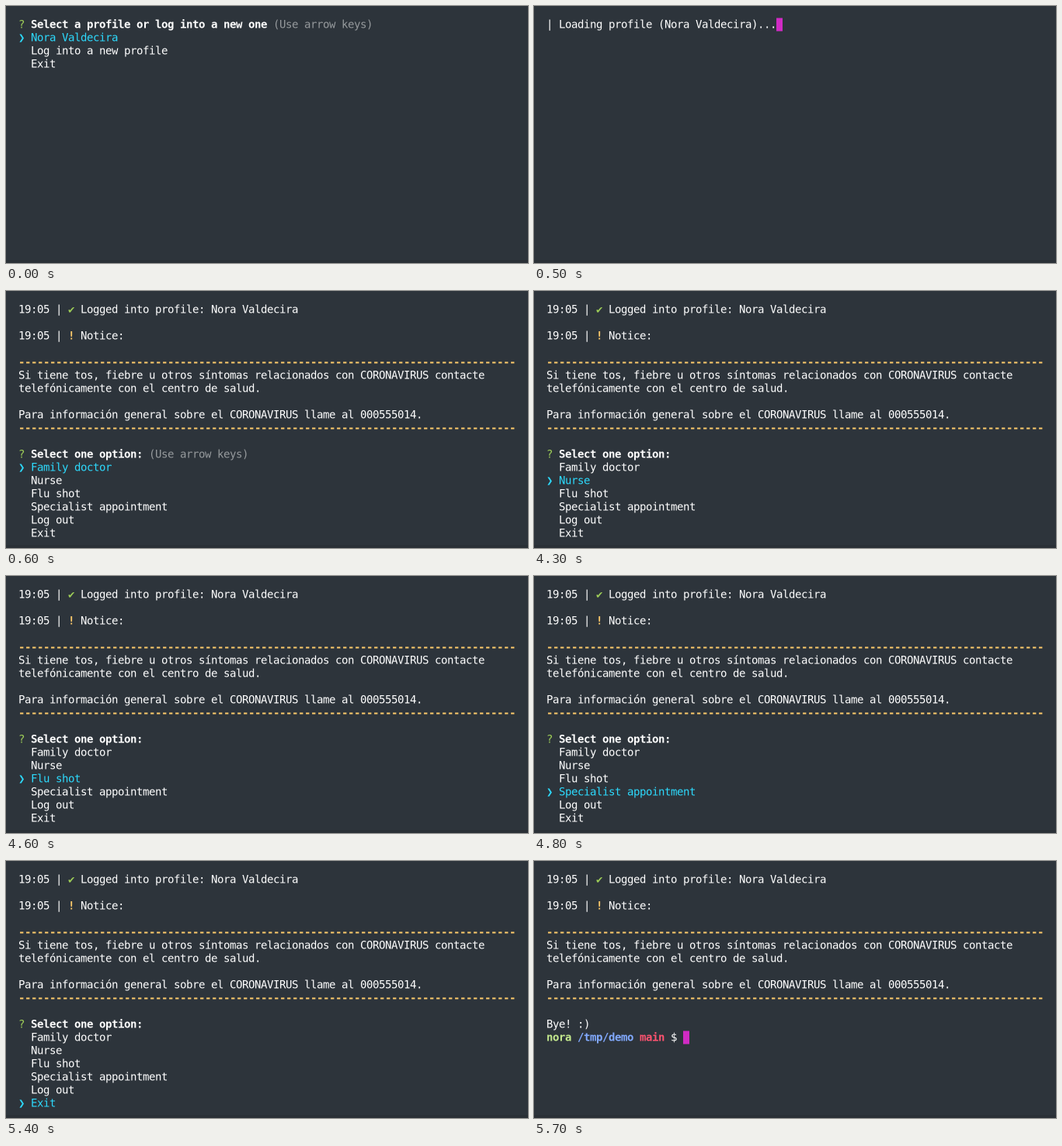
Recreate the animation shown at these times as an HTML page with a canvas. Size 672 by 332 pixels, loop 8000 ms.

```html
<!DOCTYPE html>
<html lang="en">
<head>
<meta charset="utf-8">
<title>Terminal session</title>
<style>
  html, body { margin: 0; width: 100%; height: 100%; overflow: hidden; background: #2d343b; }
  canvas { display: block; width: 672px; height: 332px; }
</style>
</head>
<body>
<canvas id="screen"></canvas>
<script>
const W = 672, H = 332;
const DENSITY = 2; // drawn at double density, like a HiDPI terminal
const screen2d = document.getElementById('screen');
screen2d.width = W * DENSITY;
screen2d.height = H * DENSITY;
const ctx = screen2d.getContext('2d');
ctx.scale(DENSITY, DENSITY);

const LOOP = 8000;
const CELL_W = 8, CELL_H = 17, LEFT = 16, TOP = 15.5, BASELINE = 13;
const FONT = '14px "DejaVu Sans Mono", "DejaVu Sans", monospace';

const COLOR = {
  back: '#2d343b', edge: '#2a3036', text: '#ffffff', dim: '#969a9d',
  green: '#9ece58', lime: '#c3e88d', yellow: '#ffcb6b', cyan: '#2ddafd',
  blue: '#82aaff', red: '#ff5370', cursor: '#d02bc4'
};

const USER = 'Nora Valdecira';
const HINT = '(Use arrow keys)';
const OPTIONS = ['Family doctor', 'Nurse', 'Flu shot', 'Specialist appointment', 'Log out', 'Exit'];
const MOVES = [4300, 4600, 4800, 5100, 5400];
const LOADING = 500, LOGGED_IN = 600, BYE = 5700;

// Writes text on the character grid and returns the next free column.
function put(col, row, text, color = COLOR.text, bold = false) {
  ctx.font = (bold ? 'bold ' : '') + FONT;
  ctx.fillStyle = color;
  for (const ch of text) {
    if (ch !== ' ') ctx.fillText(ch, LEFT + col * CELL_W, TOP + row * CELL_H + BASELINE);
    col++;
  }
  return col;
}

function cursor(col, row) {
  ctx.fillStyle = COLOR.cursor;
  ctx.fillRect(LEFT + col * CELL_W, TOP + row * CELL_H, CELL_W, CELL_H);
}

function menu(row, question, options, selected, hint) {
  put(0, row, '?', COLOR.green);
  const end = put(2, row, question, COLOR.text, true);
  if (hint) put(end + 1, row, HINT, COLOR.dim);
  options.forEach((label, i) => {
    const active = i === selected;
    if (active) put(0, row + 1 + i, '❯', COLOR.cyan);
    put(2, row + 1 + i, label, active ? COLOR.cyan : COLOR.text);
  });
}

function notice() {
  const rule = '-'.repeat(80);
  put(0, 0, '19:05 |');
  put(8, 0, '✔', COLOR.green);
  put(10, 0, 'Logged into profile: ' + USER);
  put(0, 2, '19:05 |');
  put(8, 2, '!', COLOR.yellow, true);
  put(10, 2, 'Notice:');
  put(0, 4, rule, COLOR.yellow, true);
  put(0, 5, 'Si tiene tos, fiebre u otros síntomas relacionados con CORONAVIRUS contacte');
  put(0, 6, 'telefónicamente con el centro de salud.');
  put(0, 8, 'Para información general sobre el CORONAVIRUS llame al 000555014.');
  put(0, 9, rule, COLOR.yellow, true);
}

function prompt() {
  put(0, 11, 'Bye! :)');
  let col = put(0, 12, 'nora ', COLOR.lime, true);
  col = put(col, 12, '/tmp/demo ', COLOR.blue, true);
  col = put(col, 12, 'main ', COLOR.red, true);
  cursor(put(col, 12, '$ '), 12);
}

function draw(t) {
  ctx.fillStyle = COLOR.back;
  ctx.fillRect(0, 0, W, H);
  ctx.fillStyle = COLOR.edge;
  ctx.fillRect(0, H - 4, W, 4);

  if (t < LOADING) {
    menu(0, 'Select a profile or log into a new one', [USER, 'Log into a new profile', 'Exit'], 0, true);
  } else if (t < LOGGED_IN) {
    cursor(put(0, 0, `| Loading profile (${USER})...`), 0);
  } else {
    notice();
    if (t < BYE) {
      const selected = MOVES.filter(at => t >= at).length;
      menu(11, 'Select one option:', OPTIONS, selected, selected === 0);
    } else {
      prompt();
    }
  }
}

const start = performance.now();
function tick() {
  draw((performance.now() - start) % LOOP);
  requestAnimationFrame(tick);
}
tick();
</script>
</body>
</html>
```
